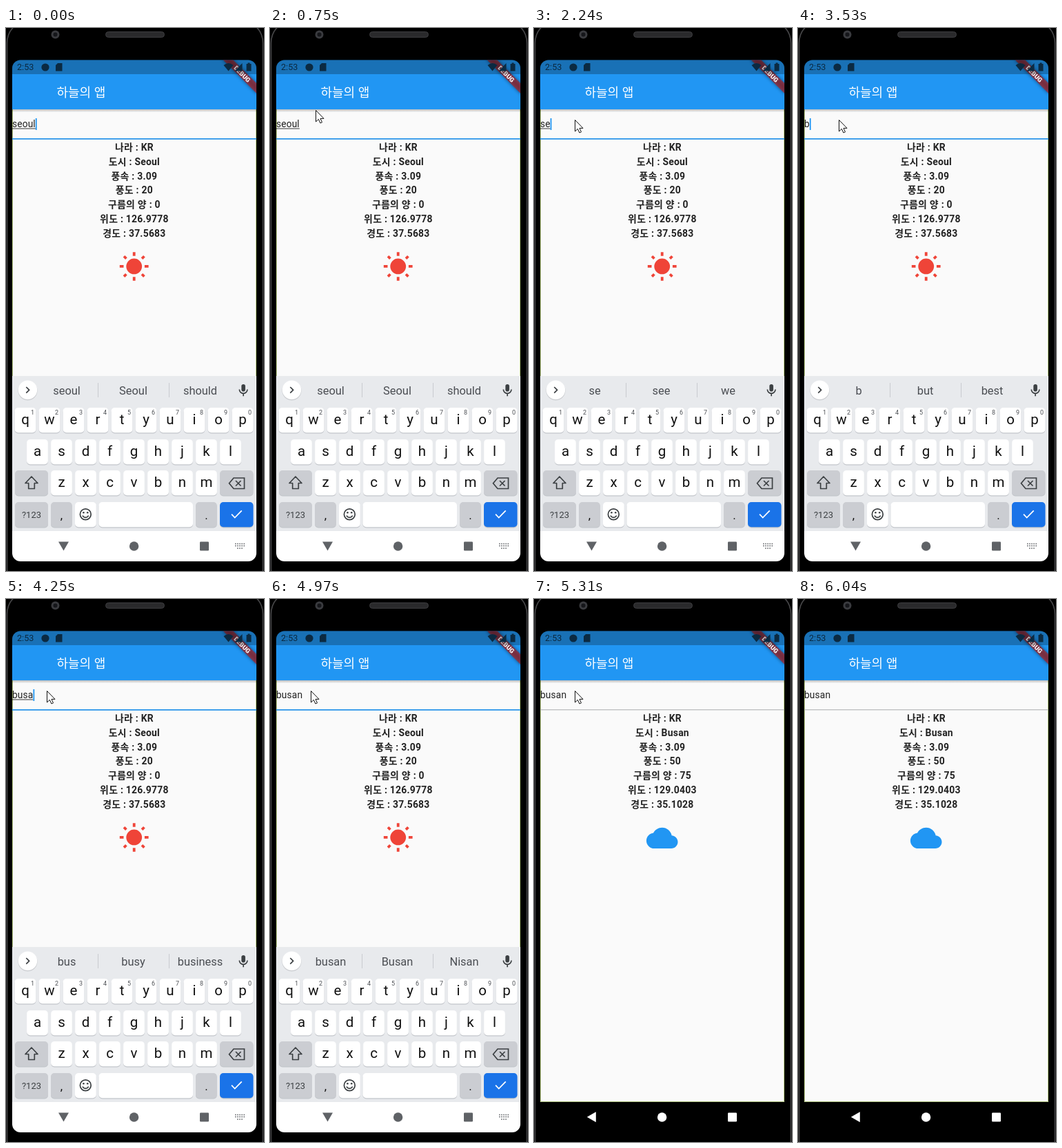
Recreate the animation shown at these times as an HTML page. Size 374 by 788 pixels, loop 7.37 s.

```html
<!DOCTYPE html>
<html lang="ko">
<head>
<meta charset="utf-8">
<title>Weather app</title>
<style>
html, body { margin: 0; width: 100%; height: 100%; overflow: hidden; background: #000; }
svg { display: block; width: 374px; height: 788px; }
text { font-family: Roboto, "Noto Sans CJK KR", "Noto Sans CJK", sans-serif; white-space: pre; }
.mid { text-anchor: middle; }
.info { font-size: 13.9px; letter-spacing: .26px; font-weight: 700; fill: #222; }
.field { font-size: 13.78px; letter-spacing: .13px; fill: #222; }
.hint { font-size: 16.4px; fill: #4b4e53; }
.letter { font-size: 20.5px; fill: #111; }
.digit { font-size: 9px; fill: #4b4e53; }
.line { fill: none; stroke: #3c4043; stroke-width: 1.7; }
</style>
</head>
<body>
<svg viewBox="0 0 374 788">
  <defs>
    <clipPath id="screen"><rect x="9" y="46.400" width="354" height="727.600" rx="12"/></clipPath>
    <linearGradient id="shade" x2="0" y2="1">
      <stop offset="0" stop-opacity=".24"/><stop offset="1" stop-opacity="0"/>
    </linearGradient>
    <filter id="soft" x="-20%" y="-150%" width="140%" height="400%"><feGaussianBlur stdDeviation="2.6"/></filter>
  </defs>
  <rect width="374" height="788"/>
  <rect x="1.500" y="-12" width="371" height="830" rx="34" fill="none" stroke="#454547" stroke-width="1.700"/>
  <rect x="144.500" y="5.500" width="85" height="8" rx="4" fill="#2a2a2c" stroke="#3c3c3f"/>
  <circle cx="71.500" cy="9.500" r="6" fill="#3a3b3f"/>
  <circle cx="71.500" cy="9.500" r="3" fill="#15161a"/>

  <g clip-path="url(#screen)">
    <rect x="9" y="67" width="354" height="663" fill="#fafafa"/>
    <path d="M9.500 118V729.500H362.500V118" fill="none" stroke="#adc07a"/>
    <rect x="9" y="118" width="354" height="4.500" fill="url(#shade)"/>
    <rect x="9" y="46" width="354" height="72" fill="#2196f3"/>
    <text x="73.500" y="100" font-size="18" fill="#fff">하늘의 앱</text>
    <g transform="translate(363 46) rotate(45)">
      <rect x="-34.400" y="24.100" width="68.800" height="10.300" opacity=".5" filter="url(#soft)"/>
      <rect x="-34.400" y="24.100" width="68.800" height="10.300" fill="#b71c1c" opacity=".63"/>
      <text class="mid" y="32.500" font-size="9.200" font-weight="900" fill="#fff">DEBUG</text>
    </g>
    <rect x="9" y="46" width="354" height="21" opacity=".25"/>
    <g fill="#0b2a42">
      <text x="16" y="61" font-size="12.600">2:53</text>
      <circle cx="57" cy="57" r="5.600"/>
      <path d="M75 51h6.500v11.500h-9.500v-8.500z"/>
      <path d="M315.500 54q7-6 14 0l-7 8.500z"/>
      <path d="M342.500 51v11.500h-11z"/>
      <path d="M350.500 50.500h3v1.500h2v10.500h-7v-10.500h2z"/>
    </g>

    <rect id="rule" x="9" width="354"/>
    <text id="typed" class="field" x="9" y="144"/>
    <rect id="under" x="9" y="145.500" height="1" fill="#333"/>
    <rect id="caret" y="131" width="1.800" height="17" fill="#2196f3"/>
    <path id="handle" d="M43.300 147.200l7.070 7.070a10 10 0 1 1-14.140 0z" fill="#2196f3"/>
    <g id="info"></g>
    <g transform="translate(162.900 324.100) scale(1.9)">
      <path id="sun" fill="#ef4438" d="M6.760 4.840l-1.800-1.790-1.410 1.410 1.790 1.790zM4 10.500H1v2h3zM13 .55h-2V3.500h2zM20.450 4.460l-1.410-1.410-1.790 1.790 1.410 1.410zM17.240 18.160l1.790 1.800 1.410-1.410-1.800-1.790zM20 10.500v2h3v-2zM12 5.500a6 6 0 1 0 0 12a6 6 0 1 0 0-12zM11 22.450h2V19.500h-2zM3.550 18.540l1.410 1.410 1.790-1.800-1.410-1.410z"/>
      <path id="cloud" fill="#2196f3" d="M19.350 10.040C18.670 6.590 15.640 4 12 4 9.110 4 6.600 5.640 5.350 8.040 2.340 8.360 0 10.910 0 14c0 3.310 2.690 6 6 6h13c2.760 0 5-2.240 5-5 0-2.640-2.050-4.780-4.650-4.960z"/>
    </g>

    <g id="board">
      <rect x="9" y="505" width="354" height="225" fill="#e8eaed"/>
      <rect x="9" y="730" width="354" height="44" fill="#fff"/>
      <circle cx="31.500" cy="526.300" r="14" fill="#c9cbcf"/>
      <circle cx="31.500" cy="525.300" r="13.700" fill="#fff"/>
      <path class="line" d="M29.300 521l4.300 4.300-4.300 4.300"/>
      <rect x="341.300" y="517" width="5.600" height="10.500" rx="2.800" fill="#3c4043"/>
      <path class="line" d="M338.300 524.500a5.800 5.800 0 0 0 11.600 0M344.100 530.300v4"/>
      <g id="hints">
        <path d="M133.500 515v21M236.500 515v21" stroke="#c9cbcf"/>
        <text class="hint mid" x="88" y="532"/>
        <text class="hint mid" x="184.500" y="532"/>
        <text class="hint mid" x="281.500" y="532"/>
      </g>
      <g id="keys"></g>
      <path class="line" d="M37 651l9 9.500h-4.700v8h-8.600v-8H28z" stroke-linejoin="round"/>
      <path class="line" d="M330 653h15.500v15.500H330l-6.500-7.750zM333 657l7.500 7.500M340.500 657l-7.500 7.500"/>
      <circle class="line" cx="115.300" cy="705.700" r="7.900"/>
      <path class="line" d="M111 707.500a4.700 4.700 0 0 0 8.600 0"/>
      <circle cx="112.400" cy="703.200" r="1.300" fill="#3c4043"/>
      <circle cx="118.200" cy="703.200" r="1.300" fill="#3c4043"/>
      <path d="M327 705.700l4.700 4.800 10-10.200" fill="none" stroke="#fff" stroke-width="1.700"/>
    </g>

    <g id="nav">
      <path id="back" d="M-7.500-6.300h15L0 6.700z"/>
      <circle cx="185.600" cy="752" r="6.700"/>
      <rect x="281" y="745.500" width="13" height="13" rx="1.200"/>
    </g>
    <path id="dots" d="M332 748.500h14M332 751.500h14M335 755h8" stroke="#5f6266" stroke-width="1.600" stroke-dasharray="1.600 1.500"/>
  </g>
  <path id="mouse" d="M.5.500V17l3.900-3.600 2.500 5.600 2.600-1.100-2.500-5.500h5z" fill="#fff" stroke="#111"/>
</svg>
<script>
const LOOP = 7370;
const $ = id => document.getElementById(id);
const show = (id, on) => $(id).setAttribute('visibility', on ? 'visible' : 'hidden');
const attrs = (el, o) => { for (const k in o) el.setAttribute(k, o[k]); return el; };
const add = (parent, tag, o, text) => {
  const el = attrs(document.createElementNS('http://www.w3.org/2000/svg', tag), o);
  if (text) el.textContent = text;
  return parent.appendChild(el);
};
const clamp = v => Math.max(0, Math.min(1, v));
const smooth = p => p * p * (3 - 2 * p);
const mix = (a, b, p) => a + (b - a) * p;
const stepped = (t, from, step) => from + Math.floor((t - from) / step) * step;

// Keyboard
const keys = $('keys');
const GREY = '#cbcdd2';
function key(x, y, w, fill = '#fff') {
  add(keys, 'rect', { x, y: y + 1.2, width: w, height: 36.3, rx: 5, fill: '#c3c6cb' });
  add(keys, 'rect', { x, y, width: w, height: 36.3, rx: 5, fill });
}
const label = (x, y, s, cls = 'letter', style = '') => add(keys, 'text', { x, y, class: cls + ' mid', style }, s);
[['qwertyuiop', 28, 551], ['asdfghjkl', 45.5, 597], ['zxcvbnm', 80.5, 642]].forEach(([row, x0, y], r) => {
  [...row].forEach((c, i) => {
    const x = x0 + 35 * i;
    key(x - 15.4, y, 30.8);
    label(x, y + 24, c);
    if (!r) label(x + 10.5, y + 10, String((i + 1) % 10), 'digit');
  });
});
key(13, 642, 48, GREY);
key(310, 642, 48.5, GREY);
const LAST = 688;
key(13, LAST, 48, GREY);
key(65, LAST, 30.8, GREY);
key(100, LAST, 30.8);
key(134.5, LAST, 136.5);
key(275, LAST, 30.8, GREY);
key(310, LAST, 48.5, '#1a73e8');
label(37, 711, '?123', 'hint', 'font-size:13px;fill:#3c4043');
label(80.5, 713, ',', 'letter', 'font-size:17px');
label(290.5, 713, '.', 'letter', 'font-size:17px');

// Weather lines
const names = ['나라', '도시', '풍속', '풍도', '구름의 양', '위도', '경도'];
const seoul = ['KR', 'Seoul', '3.09', '20', '0', '126.9778', '37.5683'];
const busan = ['KR', 'Busan', '3.09', '50', '75', '129.0403', '35.1028'];
const lines = names.map((n, i) => add($('info'), 'text', { class: 'info mid', x: 185.9, y: 178 + 20.75 * i }));

// Each list: start time, value
const typing = [[0, 'seoul'], [1900, 'seou'], [2040, 'seo'], [2170, 'se'], [2370, 's'], [2510, ''],
  [3370, 'b'], [3590, 'bu'], [3860, 'bus'], [4250, 'busa'], [4450, 'busan']];
const hints = [[0, 'seoul Seoul should'], [1970, 'seou Seoul soul'], [2110, 'seo see so'], [2240, 'se see we'],
  [2510, ''], [3530, 'b but best'], [3660, 'bu but busy'], [3990, 'bus busy business'],
  [4320, 'busa Busan bus'], [4510, 'busan Busan Nisan'], [5040, '']];
const caretOn = [[0, true], [410, false], [960, true], [1490, false], [1900, true], [2980, false], [3370, true], [4970, false]];
const at = (list, t) => list.reduce((v, [from, x]) => t >= from ? x : v, list[0][1]);

function mousePos(t) {
  if (t < 70 || t >= 6040) return null;
  if (t < 820) {
    const p = smooth(clamp((stepped(t, 70, 68) - 70) / 680));
    return [mix(331, 66, p), mix(723, 119, p)];
  }
  if (t < 5910) {
    const p = clamp((stepped(t, 820, 68) - 752) / 204);
    return [mix(66, 59, p), mix(119, 133, p)];
  }
  return t < 5980 ? [122, 215] : [216, 337];
}

const typedText = $('typed');
const hintTexts = $('hints').querySelectorAll('text');

function draw(t) {
  const text = at(typing, t);
  typedText.textContent = text;
  const width = text ? typedText.getComputedTextLength() : 0;
  attrs($('under'), { width: t >= 4970 || text === 'b' ? 0 : width });
  attrs($('caret'), { x: 9 + width });
  show('caret', at(caretOn, t));
  show('handle', t >= 960 && t < 1900);

  const focus = t < 5040;
  attrs($('rule'), { y: focus ? 160 : 160.3, height: focus ? 1.8 : 1, fill: focus ? '#2e97ea' : '#a9abad' });

  const words = at(hints, t);
  show('hints', words);
  words.split(' ').forEach((w, i) => hintTexts[i].textContent = w);

  const done = t >= 5310;
  lines.forEach((el, i) => el.textContent = names[i] + ' : ' + (done ? busan : seoul)[i]);
  show('sun', !done);
  show('cloud', done);

  const p = clamp((stepped(t, 4970, 70) - 4970) / 210);
  attrs($('board'), { transform: `translate(0 ${(273 * smooth(p)).toFixed(1)})` });
  show('board', p < 1);
  attrs($('nav'), { fill: p < .3 ? '#5f6266' : '#fff', opacity: p > 0 ? mix(.4, 1, p) : 1 });
  attrs($('back'), { transform: `translate(83.500 751.700) rotate(${90 * p})` });
  show('dots', p < .3);

  const m = mousePos(t);
  show('mouse', m);
  if (m) attrs($('mouse'), { transform: `translate(${m[0].toFixed(1)} ${m[1].toFixed(1)})` });
}

const start = performance.now();
function tick() {
  draw((performance.now() - start) % LOOP);
  requestAnimationFrame(tick);
}
tick();
</script>
</body>
</html>
```
